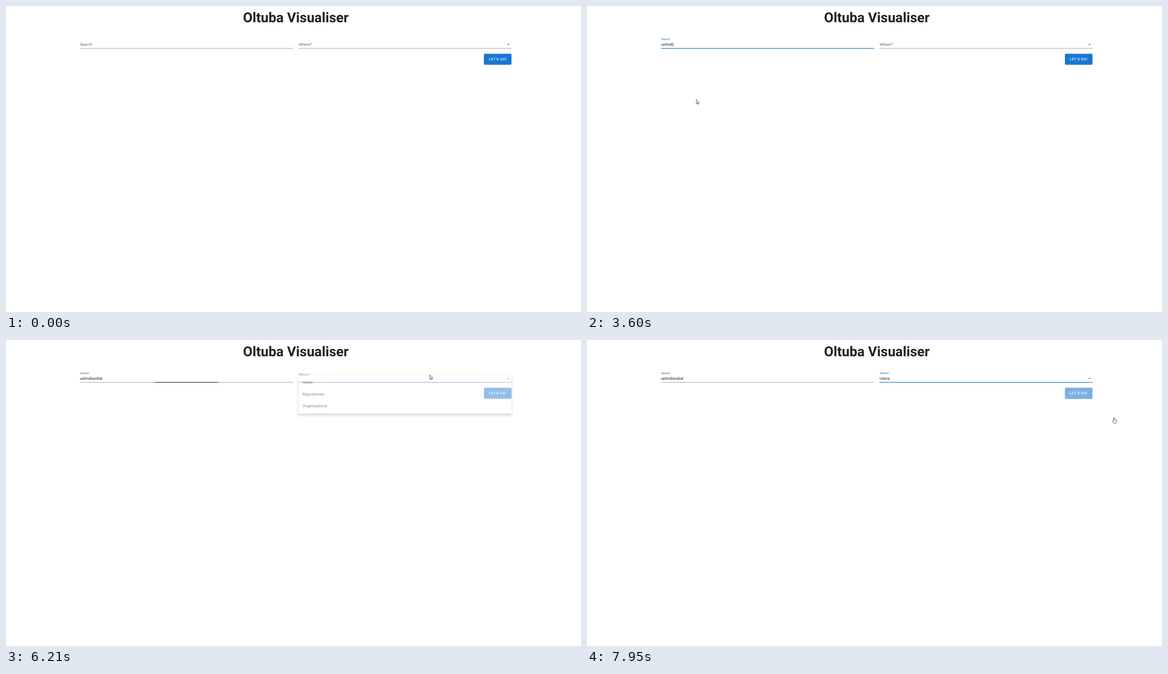
An HTML page that plays this animation: 1025x546 px, repeating every 8 s.

```html
<!DOCTYPE html>
<html lang="en">
<head>
<meta charset="utf-8">
<title>Visualiser</title>
<style>
  html, body { margin: 0; width: 100%; height: 100%; overflow: hidden; background: #fff; }
  svg { display: block; width: 100vw; height: 100vh; }
  text { font: 7px Roboto, sans-serif; fill: #212121; text-rendering: geometricPrecision; white-space: pre; }
  #title { font-size: 24.5px; font-weight: 700; text-anchor: end; }
  #go text { font-size: 6.125px; font-weight: 500; letter-spacing: .547px; fill: #fff; }
  .line { fill: #000; }
  .pointer { fill: #fff; stroke: #222; stroke-width: .7; stroke-linejoin: round; }
</style>
</head>
<body>
<svg viewBox="0 0 1025 546">
  <defs>
    <clipPath id="rowClip"><rect x="521.7" y="65" width="379.5" height="21"/></clipPath>
    <clipPath id="goClip"><rect x="852" y="85.2" width="49" height="19.2" rx="1.75"/></clipPath>
  </defs>
  <text id="title" x="610.8" y="29.4">Oltuba Visualiser</text>

  <rect id="searchLine" class="line" x="131.9" y="75" width="379.6" height="1"/>
  <rect id="searchFocus" y="75" height="1"/>
  <text id="searchLabel">Search</text>
  <text id="typed" x="131.9" y="71"></text>
  <rect id="caret" y="64.4" width=".65" height="8.4" fill="#1976d2"/>

  <rect id="whereLine" class="line" x="521.7" y="75" width="379.5" height="1"/>
  <rect id="whereFocus" y="75" height="1"/>
  <text id="whereLabel">Where?</text>
  <text id="chosen" x="521.7" y="71">Users</text>
  <path id="arrow" d="M-2.2-.9L0 1.3L2.2-.9Z"/>

  <g id="go">
    <rect x="852" y="85.2" width="49" height="19.2" rx="1.75" fill="#1976d2"/>
    <g clip-path="url(#goClip)" fill="#fff">
      <rect id="goTint" x="852" y="85" width="49" height="20"/>
      <circle id="goRipple"/>
    </g>
    <text x="860.7" y="96.9">LET'S GO!</text>
  </g>

  <g id="menu">
    <rect x="521.7" y="61.7" width="379.5" height="69.8" rx="1.75" fill="#fff"/>
    <g clip-path="url(#rowClip)">
      <rect id="rowTint" x="521" y="65" width="381" height="21"/>
      <circle id="rowRipple"/>
    </g>
    <text x="528.8" y="77.9">Users</text>
    <text x="528.8" y="98.9">Repositories</text>
    <text x="528.8" y="119.9">Organisations</text>
  </g>

  <g id="cursor">
    <path id="beam" fill="none" stroke="#222" stroke-width=".6" d="M-1.6-4.5H1.6M-1.6 4.5H1.6M0-4.5V4.5"/>
    <path id="pointer" class="pointer" d="M0 0V7.6L1.7 6.1L2.8 8.6L4 8.1L2.9 5.6H5.3Z"/>
    <path id="hand" class="pointer" d="M-.9.9Q-.9 0 0 0T.9.9V4Q2 3.4 2.3 4.3Q3.3 3.8 3.6 4.7Q4.5 4.3 4.6 5.3V7.3Q4.4 9 3.6 10H-.2Q-1 8.4-2.6 6.6Q-2.9 5.4-1.9 5.6L-.9 6.5Z"/>
  </g>
</svg>
<script>
const LOOP = 8000, SCALE = .4375;
const FOCUS_SEARCH = 850, FOCUS_WHERE = 6115, MENU_OPEN = 6160, ROW_PRESS = 6840, MENU_CLOSE = 6960, GO_PRESS = 7640;
const NAME = 'uelmdiwobal';
const KEY_TIMES = [2060, 2300, 2620, 2940, 3260, 3600, 3780, 4010, 4290, 4370, 4450];
const CARET_OFF = [[1370, 1880], [2440, 2620], [3450, 3600], [4520, 5030], [5540, 6050]];
const PATH = [[50, 300, -12], [330, 236, 76], [520, 236, 76], [850, 196, 69], [1040, 190, 108.5], [1220, 195, 167],
  [5030, 195, 167], [5360, 267.8, 195.4], [5830, 752, 70], [6115, 758, 67], [6210, 756, 62.3],
  [6630, 634.8, 69.6], [7050, 634.8, 69.6], [7580, 880, 95], [7660, 880, 95], [7950, 939.6, 138.4]];
const GREY = [102, 102, 102], BLUE = [25, 118, 210];

const $ = id => document.getElementById(id);
const lerp = (a, b, p) => a + (b - a) * p;
const mix = (a, b, p) => `rgb(${a.map((v, i) => lerp(v, b[i], p))})`;
const set = (id, attrs) => { for (const k in attrs) $(id).setAttribute(k, attrs[k]); };

function bezier(x1, y1, x2, y2) {
  const at = (a, b, s) => 3 * (1 - s) ** 2 * s * a + 3 * (1 - s) * s * s * b + s ** 3;
  return p => {
    if (p <= 0) return 0;
    if (p >= 1) return 1;
    let lo = 0, hi = 1;
    for (let i = 0; i < 20; i++) {
      const mid = (lo + hi) / 2;
      at(x1, x2, mid) < p ? lo = mid : hi = mid;
    }
    return at(y1, y2, lo);
  };
}
const swing = bezier(.25, .8, .5, 1), fade = bezier(.25, .8, .25, 1), spread = bezier(0, 0, .2, 1);

// Layered box shadow; each layer is [offset y, blur, spread, alpha] in unscaled pixels
function addShadow(id, layers) {
  const group = $(id), box = group.querySelector('rect');
  const [x, y, w, h] = ['x', 'y', 'width', 'height'].map(k => +box.getAttribute(k));
  for (const [dy, blur, grow, alpha] of layers) {
    const r = box.cloneNode(), g = grow * SCALE;
    const attrs = { x: x - g, y: y - g + dy * SCALE, width: w + 2 * g, height: h + 2 * g, fill: '#000', 'fill-opacity': alpha };
    for (const k in attrs) r.setAttribute(k, attrs[k]);
    r.style.filter = `blur(${blur * SCALE / 2}px)`;
    group.insertBefore(r, box);
  }
}
addShadow('menu', [[5, 5, -3, .2], [8, 10, 1, .14], [3, 14, 2, .12]]);
addShadow('go', [[3, 1, -2, .2], [2, 2, 0, .14], [1, 5, 0, .12]]);

function drawField(name, x, width, raised, active, line, hover) {
  set(name + 'Label', {
    transform: `translate(${x} ${lerp(71, 61.4, raised)}) scale(${lerp(1, .75, raised)})`,
    style: 'fill:' + mix(GREY, BLUE, active)
  });
  set(name + 'Focus', { x: x + width * (1 - line) / 2, width: width * line });
  set(name + 'Line', { 'fill-opacity': lerp(.32, .6, hover) });
}

// Ripple travels from the pressed point to the centre while it grows
function drawRipple(id, t, start, from, centre, radius, alpha) {
  const p = spread((t - start) / 250);
  set(id, {
    cx: lerp(from[0], centre[0], p), cy: lerp(from[1], centre[1], p),
    r: radius * lerp(.3, 1, p), opacity: t < start ? 0 : alpha
  });
}

function drawCursor(t) {
  let i = PATH.findIndex(k => k[0] > t);
  if (i < 0) i = PATH.length;
  const a = PATH[Math.max(i - 1, 0)], b = PATH[Math.min(i, PATH.length - 1)];
  const p = b[0] > a[0] ? (t - a[0]) / (b[0] - a[0]) : 0;
  set('cursor', { transform: `translate(${lerp(a[1], b[1], p)} ${lerp(a[2], b[2], p)})` });
  const kind = t > 250 && t < 880 ? 'beam' : t > 6380 ? 'hand' : 'pointer';
  for (const id of ['beam', 'pointer', 'hand']) $(id).style.display = id === kind ? '' : 'none';
}

function draw(t) {
  const after = (start, dur = 300) => swing((t - start) / dur);
  const focus = after(FOCUS_SEARCH), where = after(FOCUS_WHERE), close = after(MENU_CLOSE);

  drawField('search', 131.9, 379.6, focus, focus - where, focus - where, after(230) - after(890));
  drawField('where', 521.7, 379.5, where, where, where, after(5780) - after(6200));
  set('searchFocus', { fill: t < FOCUS_WHERE ? '#1b6ab8' : '#222' });
  set('whereFocus', { fill: '#1b6ab8' });

  $('typed').textContent = NAME.slice(0, KEY_TIMES.filter(k => k <= t).length);
  const caretOn = t >= FOCUS_SEARCH && t < FOCUS_WHERE && !CARET_OFF.some(([a, b]) => t >= a && t < b);
  set('caret', { x: 132.2 + $('typed').getComputedTextLength(), opacity: +caretOn });

  set('chosen', { opacity: +(t >= MENU_CLOSE) });
  set('arrow', {
    transform: `translate(895.8 68.7) rotate(${180 * (where - close)})`,
    fill: mix(GREY, BLUE, where)
  });

  set('menu', { opacity: fade((t - MENU_OPEN) / 300) - fade((t - MENU_CLOSE) / 300) });
  set('rowTint', { opacity: .04 * after(6380) });
  drawRipple('rowRipple', t, ROW_PRESS, [634.8, 70], [711.4, 75.5], 190, .2);

  set('goTint', { opacity: .08 * after(7480, 200) + .16 * after(GO_PRESS, 200) });
  drawRipple('goRipple', t, GO_PRESS, [880, 95], [876.5, 94.8], 26.3, .25);

  drawCursor(t);
}

function tick() {
  draw(performance.now() % LOOP);
  requestAnimationFrame(tick);
}
tick();
</script>
</body>
</html>
```
